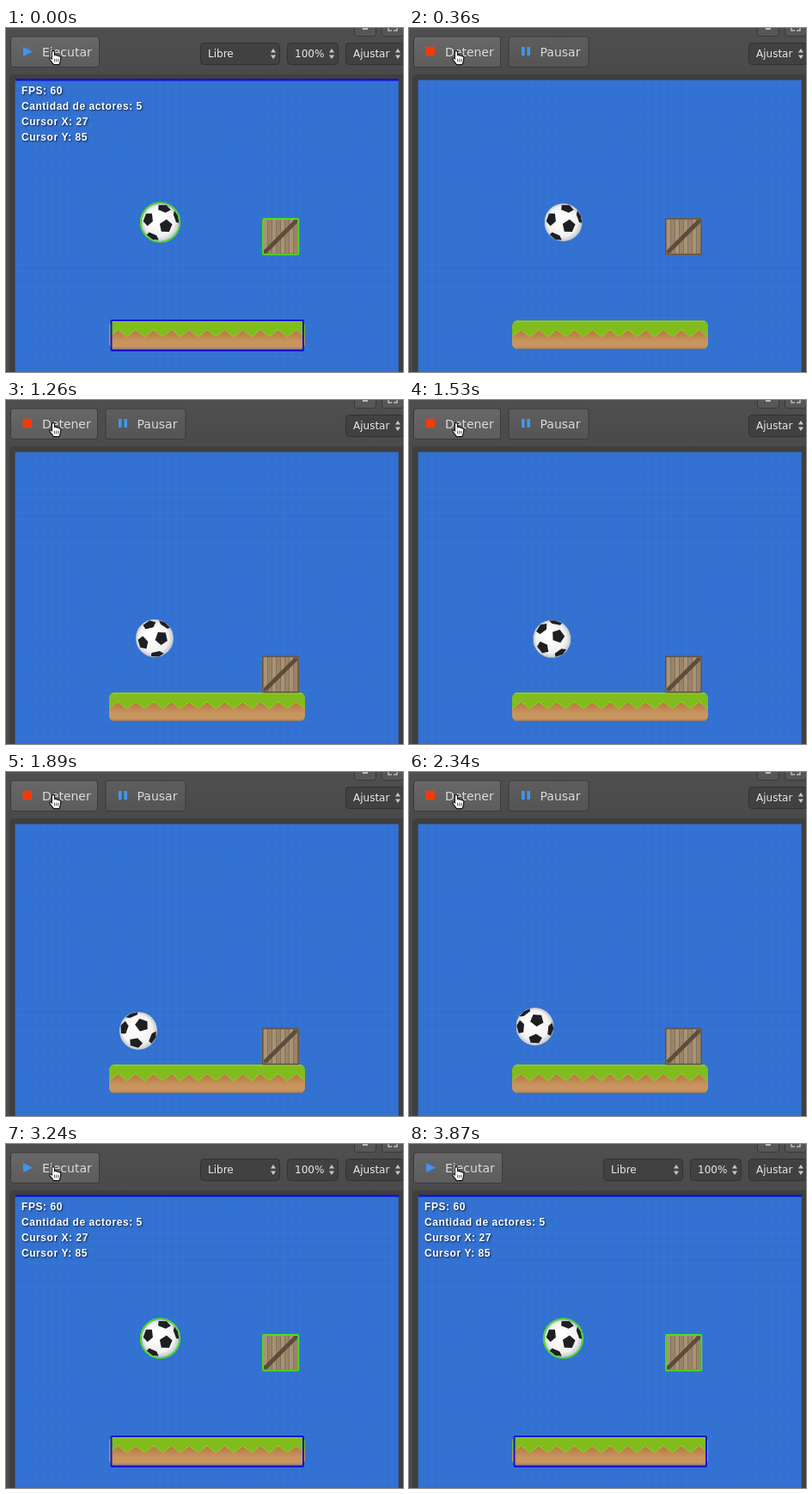
Write an HTML page with a canvas that moves like this. It is 462 by 400 pixels and loops after 3960 ms.

```html
<!DOCTYPE html>
<html lang="es">
<head>
<meta charset="utf-8">
<title>Física</title>
<style>
html, body { margin: 0; width: 100%; height: 100%; overflow: hidden; background: #4b4b4b; }
canvas { display: block; }
</style>
</head>
<body>
<canvas id="stage" width="462" height="400"></canvas>
<script>
const ctx = document.getElementById('stage').getContext('2d');
const LOOP = 3960, STEP = 90, RUN = 360, STOP = 3240;
const DROP = 379, HALF_G = 0.000647, FLOOR = 317;
const RAD = Math.PI / 180;
const UI = '"DejaVu Sans", Verdana, sans-serif';
const BOUNCES = [754, 1382, 1939, 2421, 2800, 3110, 3375];
// Ball travel: time, x, rotation in degrees
const ROLL = [[0, 179.5, 0], [754, 179.5, 0], [1382, 171.4, -45], [1939, 152.3, -98],
              [2421, 145.3, -109], [3375, 117.8, -166]];
// Ball patches: distance from the centre, angle, direction of one corner
const PATCHES = [[8.5, 35, 202], [15.5, 195, 22], [18, 285, 82], [20, 118, -37], [21, 342, 118]];

function box(x, y, w, h, r, fill, stroke, line = 1) {
  ctx.beginPath();
  ctx.roundRect(x, y, w, h, r);
  if (fill) { ctx.fillStyle = fill; ctx.fill(); }
  if (stroke) { ctx.strokeStyle = stroke; ctx.lineWidth = line; ctx.stroke(); }
}

function path(points) {
  ctx.beginPath();
  points.forEach(([x, y]) => ctx.lineTo(x, y));
}

function poly(points, fill) {
  path(points);
  ctx.closePath();
  ctx.fillStyle = fill;
  ctx.fill();
}

function vertical(y0, y1, top, bottom) {
  const g = ctx.createLinearGradient(0, y0, 0, y1);
  g.addColorStop(0, top);
  g.addColorStop(1, bottom);
  return g;
}

function label(text, x, y, font, color) {
  ctx.font = font;
  ctx.fillStyle = color;
  ctx.fillText(text, x, y);
}

function button(x, w, text, hover) {
  const fill = hover ? vertical(10, 46, '#686868', '#5c5c5c') : vertical(10, 46, '#5e5e5e', '#545454');
  box(x + 0.5, 10, w - 1, 35.5, 3, fill, '#3a3a3a');
  label(text, x + 37, 33, '14px ' + UI, '#dadada');
}

function select(x, w, text) {
  box(x + 0.5, 17.5, w - 1, 25, 4, '#414141', '#313131');
  label(text, x + 9, 34, '12px ' + UI, '#e8e8e8');
  const a = x + w - 8;
  poly([[a - 3, 28.5], [a, 24], [a + 3, 28.5]], '#c8c8c8');
  poly([[a - 3, 31.5], [a, 36], [a + 3, 31.5]], '#c8c8c8');
}

function toolbar(running) {
  ctx.fillStyle = vertical(0, 54, '#4f4f4f', '#4a4a4a');
  ctx.fillRect(0, 0, 462, 400);
  box(4, 54, 470, 360, 5, '#3f3f3f');
  for (const x of [405.5, 437.5]) box(x, -10.5, 25, 20, 3, '#575757', '#383838');
  ctx.fillStyle = '#bcbcbc';
  ctx.fillRect(415, 0, 6, 2);
  ctx.strokeStyle = '#bcbcbc';
  ctx.lineWidth = 1.5;
  for (const [x, d] of [[445, 4], [455, -4]]) {
    path([[x, 0], [x, 3], [x + d, 3]]);
    ctx.stroke();
  }
  if (running) {
    button(5, 102, 'Detener', true);
    ctx.fillStyle = '#f03c0c';
    ctx.fillRect(19.5, 21.7, 10.5, 10.5);
    button(115.5, 94, 'Pausar');
    ctx.fillStyle = '#4596ea';
    ctx.fillRect(131, 22, 3.6, 10);
    ctx.fillRect(137.4, 22, 3.6, 10);
  } else {
    button(5, 104, 'Ejecutar', true);
    poly([[20, 22], [31, 27.5], [20, 33]], '#3f93f0');
    select(226, 93, 'Libre');
    select(327, 60, '100%');
  }
  select(395, 69, 'Ajustar');
}

function hand() {
  ctx.save();
  ctx.translate(49.7, 25.3);
  ctx.scale(1.05, 1.05);
  ctx.beginPath();
  ctx.moveTo(3.5, 10);
  ctx.lineTo(3.5, 2);
  ctx.quadraticCurveTo(5, 0, 6.3, 2);
  ctx.lineTo(6.6, 6);
  ctx.quadraticCurveTo(8.4, 4.8, 9.2, 6.6);
  ctx.quadraticCurveTo(11, 5.6, 11.6, 7.4);
  ctx.quadraticCurveTo(13.4, 6.8, 13.4, 9);
  ctx.quadraticCurveTo(13.5, 13, 11.5, 16.5);
  ctx.lineTo(5.5, 16.5);
  ctx.lineTo(1, 10.5);
  ctx.quadraticCurveTo(0.8, 8, 3.5, 10);
  ctx.closePath();
  ctx.fillStyle = '#fff';
  ctx.fill();
  ctx.strokeStyle = '#111';
  ctx.lineWidth = 1.1;
  ctx.stroke();
  ctx.beginPath();
  for (const x of [6.6, 8.7, 10.8]) { ctx.moveTo(x, 10); ctx.lineTo(x, 13.5); }
  ctx.lineWidth = 0.7;
  ctx.stroke();
  ctx.restore();
}

function sky() {
  ctx.fillStyle = '#3271d1';
  ctx.fillRect(10.6, 60.5, 446.2, 340);
  ctx.fillStyle = 'rgba(255,255,255,0.025)';
  for (let x = 17; x < 456; x += 9) ctx.fillRect(x, 61, 1, 339);
  for (let y = 67; y < 400; y += 9) ctx.fillRect(11, y, 445, 1);
}

function zigzag(top, depth, teeth = 11) {
  return Array.from({ length: teeth * 2 + 1 },
    (_, i) => [120 + i * 114 / teeth, top + (i % 2 ? 0 : depth)]);
}

function platform() {
  ctx.save();
  ctx.beginPath();
  ctx.roundRect(120, 340.3, 228, 32.7, 6);
  ctx.clip();
  ctx.fillStyle = '#80bd1c';
  ctx.fillRect(120, 340, 228, 34);
  ctx.fillStyle = '#92c832';
  ctx.fillRect(120, 340, 228, 2);
  const edge = zigzag(351, 8);
  poly([...edge, [348, 374], [120, 374]], vertical(352, 364, '#b87740', '#c8955f'));
  path(edge);
  ctx.strokeStyle = '#9cc63a';
  ctx.lineWidth = 1;
  ctx.stroke();
  ctx.fillStyle = '#b98450';
  ctx.fillRect(120, 371.5, 228, 2);
  ctx.restore();
}

function crate(y) {
  ctx.save();
  ctx.translate(298, y - 21.5);
  box(0, 0, 43, 43, 1.5, '#65543f');
  ctx.fillStyle = '#a38d72';
  ctx.fillRect(1.6, 1.6, 39.8, 39.8);
  for (let i = 0; i < 8; i++) {
    const x = 1.6 + i * 5;
    ctx.fillStyle = i % 2 ? 'rgba(70,52,34,0.1)' : 'rgba(255,235,205,0.06)';
    ctx.fillRect(x, 1.6, 5, 39.8);
    ctx.fillStyle = 'rgba(75,58,40,0.38)';
    if (i) ctx.fillRect(x - 0.4, 1.6, 0.8, 39.8);
  }
  poly([[2, 41], [2, 37.6], [37.6, 2], [41, 2], [41, 5.4], [5.4, 41]], '#5c4c3c');
  ctx.restore();
}

// A pentagon lying on the sphere, squeezed towards the rim
function patch(R, dist, angle, corner) {
  const tilt = Math.asin(dist / R), size = 0.38;
  const pts = [];
  for (let i = 0; i < 5; i++) {
    const a = (corner - angle + i * 72) * RAD;
    const along = Math.sin(tilt) * Math.cos(size) + Math.cos(tilt) * Math.sin(size) * Math.cos(a);
    pts.push([along * R, Math.sin(size) * Math.sin(a) * R]);
  }
  ctx.save();
  ctx.rotate(angle * RAD);
  poly(pts, '#1e1f22');
  ctx.restore();
}

function ball(x, y, turn) {
  const R = 22;
  ctx.save();
  ctx.translate(x, y);
  ctx.beginPath();
  ctx.arc(0, 0, R, 0, 7);
  ctx.clip();
  const g = ctx.createRadialGradient(-4, -5, 4, 0, 0, R);
  g.addColorStop(0, '#ffffff');
  g.addColorStop(0.75, '#f1f1f1');
  g.addColorStop(1, '#c2c4c8');
  ctx.fillStyle = g;
  ctx.fillRect(-R, -R, 2 * R, 2 * R);
  ctx.rotate(turn * RAD);
  for (const p of PATCHES) patch(R, ...p);
  ctx.restore();
}

function ballHeight(t) {
  if (t < BOUNCES[0]) return 226 + HALF_G * Math.max(0, t - DROP) ** 2;
  const i = BOUNCES.findIndex(b => b > t);
  return FLOOR - HALF_G * (t - BOUNCES[i - 1]) * (BOUNCES[i] - t);
}

function ballRoll(t) {
  const i = ROLL.findIndex(k => k[0] > t);
  const a = ROLL[i - 1], b = ROLL[i], f = (t - a[0]) / (b[0] - a[0]);
  return [a[1] + (b[1] - a[1]) * f, a[2] + (b[2] - a[2]) * f];
}

function overlay() {
  ctx.fillStyle = '#1212d6';
  ctx.fillRect(11, 59, 446, 2.5);
  ctx.strokeStyle = '#4fe01c';
  ctx.lineWidth = 1.8;
  ctx.beginPath();
  ctx.arc(179.5, 226, 22.8, 0, 7);
  ctx.stroke();
  box(299, 222, 41.3, 41.3, 1, null, '#4fe01c', 1.8);
  box(122.5, 340, 223.5, 35, 1, null, '#1212d6', 2);
  ctx.save();
  ctx.shadowColor = 'rgba(0,0,0,0.75)';
  ctx.shadowOffsetX = ctx.shadowOffsetY = 1;
  ctx.shadowBlur = 2;
  ctx.letterSpacing = '0.55px';
  ['FPS: 60', 'Cantidad de actores: 5', 'Cursor X: 27', 'Cursor Y: 85'].forEach((s, i) =>
    label(s, 18, 77 + i * 18, 'bold 12px "Liberation Sans", Arial, sans-serif', '#fff'));
  ctx.restore();
}

function draw(t) {
  const running = t >= RUN && t < STOP;
  const time = running ? t : 0;
  toolbar(running);
  sky();
  platform();
  crate(242.5 + Math.min(76.5, HALF_G * Math.max(0, time - DROP) ** 2));
  const [x, turn] = ballRoll(time);
  ball(x, ballHeight(time), turn);
  if (!running) overlay();
  hand();
}

const start = performance.now();
function tick() {
  const t = Math.max(0, performance.now() - start) % LOOP;
  draw(Math.floor(t / STEP) * STEP);
  requestAnimationFrame(tick);
}
tick();
</script>
</body>
</html>
```
